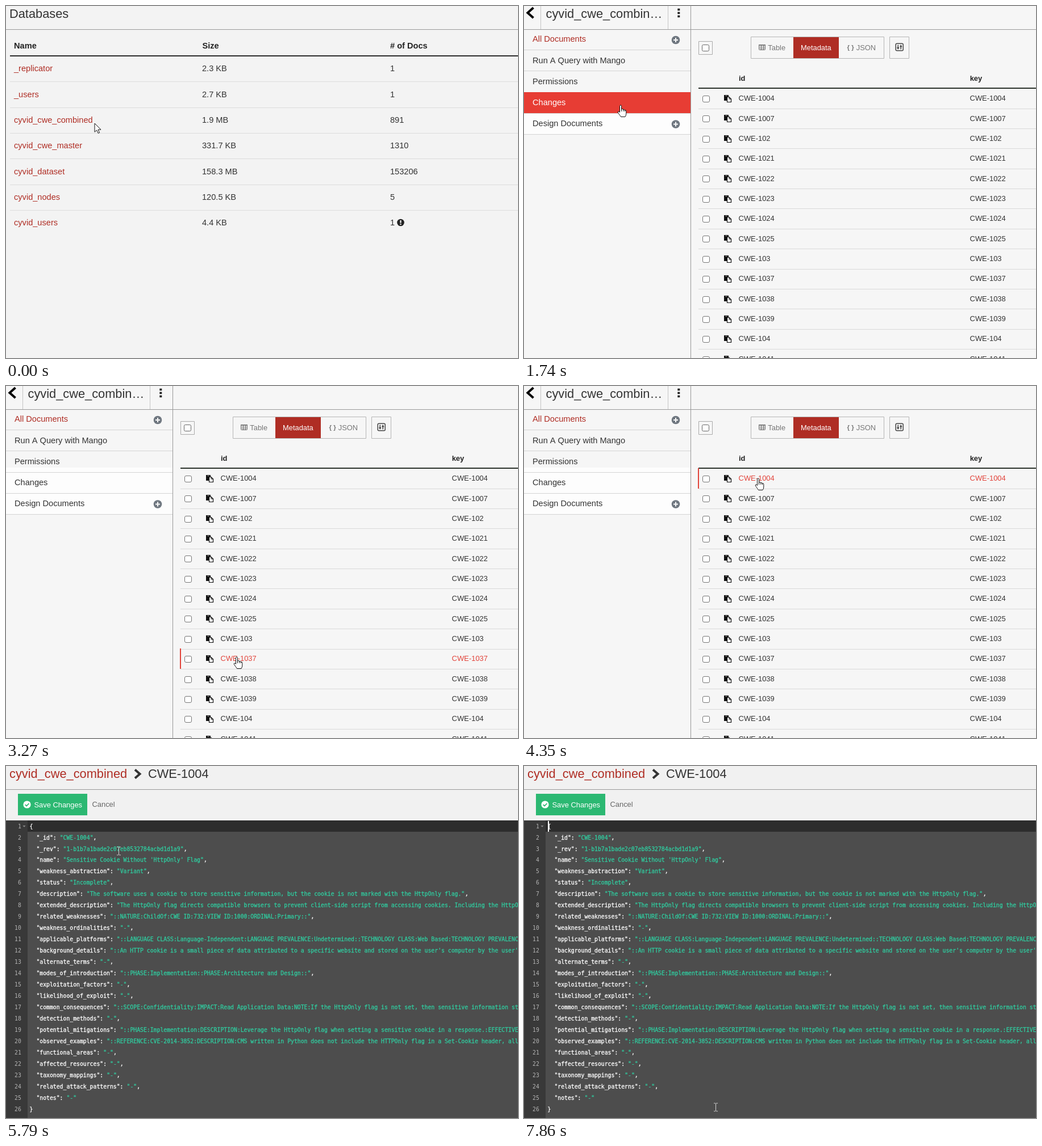
Write an HTML page with a canvas that moves like this. It is 901 px wide and 621 px high and loops after 8000 ms.

```html
<!DOCTYPE html>
<html lang="en">
<head>
<meta charset="utf-8">
<title>Database browser</title>
<style>
html, body { margin: 0; width: 100%; height: 100%; overflow: hidden; background: #f3f3f3; }
canvas { display: block; }
</style>
</head>
<body>
<canvas id="stage" width="901" height="621"></canvas>
<script>
const W = 901, H = 621, LOOP = 8000, STEP = 120;
const ctx = document.getElementById('stage').getContext('2d');
const SANS = '"Liberation Sans", Arial, sans-serif';
const MONO = '"DejaVu Sans Mono", "Noto Sans Mono", monospace';
const BODY = `14.6px ${SANS}`, BOLD = `bold 14.6px ${SANS}`;
const TITLE = `21.8px ${SANS}`, SMALL = `12.9px ${SANS}`, CODE = `9.79px ${MONO}`;
const INK = '#333', LINK = '#af2d24', HOVER = '#e2443b', RULE = '#999';

// Screen changes
const LIST = 1220, ROWS = 1370, EDITOR = 4910, LOADED = 5060;
// Caret toggles, starting visible at LOADED
const BLINKS = [5490, 5910, 6570, 7080, 7470, 7860];

// Pointer moves: start time, number of steps, end x, end y
const START = { x: 156, y: 207 };
const MOVES = [
  [430, 3, 124, 199], [820, 1, 122, 199], [1740, 1, 170, 175],
  [1890, 4, 430, 167], [2400, 4, 416, 300], [2910, 4, 406, 478],
  [3420, 1, 405, 434], [3570, 2, 406, 304], [3840, 4, 408, 167],
  [4350, 1, 412, 163], [4910, 1, 413.5, 164], [5490, 1, 384.5, 159],
  [5640, 1, 286.5, 154], [5790, 1, 198.5, 150], [5910, 1, 188, 151],
  [6060, 4, 95, 318], [6570, 1, 95, 337], [6720, 4, 106, 526],
  [7230, 4, 160, 591], [7740, 2, 337.5, 602]
];

const DATABASES = [
  ['_replicator', '2.3 KB', '1'], ['_users', '2.7 KB', '1'],
  ['cyvid_cwe_combined', '1.9 MB', '891'], ['cyvid_cwe_master', '331.7 KB', '1310'],
  ['cyvid_dataset', '158.3 MB', '153206'], ['cyvid_nodes', '120.5 KB', '5'],
  ['cyvid_users', '4.4 KB', '1']
];
const MENU = ['All Documents', 'Run A Query with Mango', 'Permissions', 'Changes', 'Design Documents'];
const IDS = '1004 1007 102 1021 1022 1023 1024 1025 103 1037 1038 1039 104 1041'.split(' ');

const FIELDS = [
  ['_id', 'CWE-1004'],
  ['_rev', '1-b1b7a1bade2c07eb8532784acbd1d1a9'],
  ['name', "Sensitive Cookie Without 'HttpOnly' Flag"],
  ['weakness_abstraction', 'Variant'],
  ['status', 'Incomplete'],
  ['description', 'The software uses a cookie to store sensitive information, but the cookie is not marked with the HttpOnly flag.'],
  ['extended_description', 'The HttpOnly flag directs compatible browsers to prevent client-side script from accessing cookies. Including the HttpOnly flag'],
  ['related_weaknesses', '::NATURE:ChildOf:CWE ID:732:VIEW ID:1000:ORDINAL:Primary::'],
  ['weakness_ordinalities', '-'],
  ['applicable_platforms', '::LANGUAGE CLASS:Language-Independent:LANGUAGE PREVALENCE:Undetermined::TECHNOLOGY CLASS:Web Based:TECHNOLOGY PREVALENCE'],
  ['background_details', "::An HTTP cookie is a small piece of data attributed to a specific website and stored on the user's computer by the user's web"],
  ['alternate_terms', '-'],
  ['modes_of_introduction', '::PHASE:Implementation::PHASE:Architecture and Design::'],
  ['exploitation_factors', '-'],
  ['likelihood_of_exploit', '-'],
  ['common_consequences', '::SCOPE:Confidentiality:IMPACT:Read Application Data:NOTE:If the HttpOnly flag is not set, then sensitive information stored'],
  ['detection_methods', '-'],
  ['potential_mitigations', '::PHASE:Implementation:DESCRIPTION:Leverage the HttpOnly flag when setting a sensitive cookie in a response.:EFFECTIVENESS'],
  ['observed_examples', '::REFERENCE:CVE-2014-3852:DESCRIPTION:CMS written in Python does not include the HTTPOnly flag in a Set-Cookie header, allowing'],
  ['functional_areas', '-'], ['affected_resources', '-'], ['taxonomy_mappings', '-'],
  ['related_attack_patterns', '-'], ['notes', '-']
];

const HAND = new Path2D('M-1.5 12V1.5Q-1.5 0 0 0T1.5 1.5V7Q4.5 5.5 4.8 8Q7 6.8 7.5 9Q9.8 8 9.8 10.5V15Q9.8 18 8 20.5H.5Q-1 18-4.4 13.5Q-5.5 11.5-4 11Q-2.8 10.6-1.5 12.5Z');
const FINGERS = new Path2D('M1.5 7V11M4.8 8V11M7.5 9V11');
const ARROW = new Path2D('M0 0V15.3L3.6 12 6.2 17.5 8.6 16.5 6 11.1H11Z');
const IBEAM = new Path2D('M-3.5-7H-1L0-6.3 1-7H3.5M0-6.3V6.3M-3.5 7H-1L0 6.3 1 7H3.5');

function rect(x, y, w, h, color) {
  ctx.fillStyle = color;
  ctx.fillRect(x, y, w, h);
}

function frame(x, y, w, h, color, radius = 0, fill) {
  ctx.beginPath();
  ctx.roundRect(x + 0.5, y + 0.5, w - 1, h - 1, radius);
  if (fill) { ctx.fillStyle = fill; ctx.fill(); }
  ctx.strokeStyle = color;
  ctx.lineWidth = 1;
  ctx.stroke();
}

function text(str, x, y, font, color = INK, align = 'left') {
  ctx.font = font;
  ctx.fillStyle = color;
  ctx.textAlign = align;
  ctx.fillText(str, x, y);
}

function disc(x, y, r, color) {
  ctx.fillStyle = color;
  ctx.beginPath();
  ctx.arc(x, y, r, 0, Math.PI * 2);
  ctx.fill();
}

function line(points, color, width) {
  ctx.strokeStyle = color;
  ctx.lineWidth = width;
  ctx.beginPath();
  points.forEach(([x, y]) => ctx.lineTo(x, y));
  ctx.stroke();
}

function plus(x, y, color, mark) {
  disc(x, y, 7.3, color);
  rect(x - 4, y - 1, 8, 2, mark);
  rect(x - 1, y - 4, 2, 8, mark);
}

function pointerAt(t) {
  let { x, y } = START;
  for (const [t0, n, ex, ey] of MOVES) {
    if (t < t0) break;
    const k = Math.min(n, Math.floor((t - t0) / STEP) + 1) / n;
    x += (ex - x) * k;
    y += (ey - y) * k;
  }
  return { x, y };
}

function drawPointer(t) {
  const { x, y } = pointerAt(t);
  ctx.save();
  ctx.translate(x, y);
  ctx.lineJoin = 'round';
  ctx.lineWidth = 1;
  if (t >= EDITOR) {
    ctx.strokeStyle = '#d0d0d0';
    ctx.stroke(IBEAM);
  } else {
    const shape = t < 430 ? ARROW : HAND;
    ctx.fillStyle = '#fff';
    ctx.strokeStyle = '#111';
    ctx.fill(shape);
    ctx.stroke(shape);
    if (shape === HAND) ctx.stroke(FINGERS);
  }
  ctx.restore();
}

function drawDatabases() {
  rect(0, 0, W, H, '#f3f3f3');
  text('Databases', 6, 21, TITLE);
  rect(0, 41, W, 1, RULE);
  ['Name', 'Size', '# of Docs'].forEach((s, i) => text(s, [14, 345.5, 676][i], 75, BOLD, '#222'));
  rect(7, 87, W, 2, '#2b2b2b');
  DATABASES.forEach(([name, size, docs], i) => {
    const y = 115.2 + i * 45.33;
    text(name, 14, y, BODY, LINK);
    text(size, 345, y, BODY);
    text(docs, 676, y, BODY);
    if (i < 6) rect(7, Math.round(133.2 + i * 45.33), W, 1, '#dcdcdc');
  });
  disc(694.5, 382, 6.3, '#222');
  rect(693.4, 378, 2.2, 4.8, '#f3f3f3');
  rect(693.4, 384, 2.2, 2, '#f3f3f3');
}

function drawSidebar(t) {
  if (t >= 1740) {
    const top = t < 1890 ? 152 : 144;
    rect(0, top, 293, 226 - top, '#fdfdfd');
  }
  const active = t < 1740 ? 4 : t < 1890 ? 3 : -1;
  MENU.forEach((label, i) => {
    const y = 77 + Math.round(i * 37.25), on = i === active;
    if (on) rect(0, y - 37, 293, 37, '#e73d34');
    rect(0, y, 293, 1, '#d4d4d4');
    text(label, 15, 63.3 + i * 37.2, BODY, on ? '#fff' : i ? INK : LINK);
    if (i % 4 === 0) {
      plus(267, i ? 208.5 : 60, on ? '#fff' : '#6f7780', on ? '#e73d34' : '#f8f8f8');
    }
  });
}

function drawToolbar(ready) {
  frame(307, 62, 25, 24, '#aaa');
  frame(313, 68, 13, 12, ready ? '#666' : '#c4c4c4', 2, ready ? '#fff' : '#f7f7f7');
  frame(399, 54, 235, 39, '#b5b5b5');
  rect(474, 55, 80, 37, LINK);
  text('Table', 429.3, 78, SMALL, '#777');
  text('Metadata', 487, 78, SMALL, '#fff');
  text('JSON', 584.7, 78, SMALL, '#777');
  text('{ }', 568.5, 77, `bold 11.5px ${SANS}`, '#777');
  frame(413, 68, 12, 10, '#777', 1);
  rect(413, 68, 12, 2, '#777');
  rect(413, 72, 12, 1, '#777');
  rect(413, 75, 12, 1, '#777');
  rect(417, 69, 1, 9, '#777');
  rect(421, 69, 1, 9, '#777');
  frame(643, 54, 35, 39, '#b5b5b5');
  ctx.lineWidth = 1.5;
  ctx.strokeStyle = '#444';
  ctx.beginPath();
  ctx.roundRect(654.2, 66.2, 13, 12.6, 2);
  ctx.stroke();
  rect(657.5, 68.5, 1.5, 8, '#444');
  rect(662.5, 68.5, 1.5, 8, '#444');
  rect(656.4, 72.8, 3.7, 2, '#444');
  rect(661.4, 70.4, 3.7, 2, '#444');
}

function copyIcon(x, y) {
  rect(x, y, 8, 10, '#111');
  rect(x + 2, y + 1, 4, 1, '#888');
  ctx.beginPath();
  ctx.moveTo(x + 5.5, y + 3.5);
  ctx.lineTo(x + 9, y + 3.5);
  ctx.lineTo(x + 12.5, y + 7);
  ctx.lineTo(x + 12.5, y + 12.5);
  ctx.lineTo(x + 5.5, y + 12.5);
  ctx.closePath();
  ctx.fillStyle = '#f8f8f8';
  ctx.fill();
  ctx.strokeStyle = '#111';
  ctx.lineWidth = 1.2;
  ctx.stroke();
  line([[x + 9, y + 3.5], [x + 9, y + 7], [x + 12.5, y + 7]], '#111', 1);
}

function hoveredRow(t) {
  if (t < 1890) return -1;
  // The highlight trails the pointer for one step at the turn
  const p = pointerAt(t >= 3420 && t < 3570 ? 3419 : t);
  return p.x < 306 ? -1 : Math.floor((p.y - 145.5) / 35.35);
}

function drawRows(t) {
  const hover = hoveredRow(t), head = `bold 12.9px ${SANS}`;
  text('id', 378, 132, head, '#222');
  text('key', 784.7, 132, head, '#222');
  IDS.forEach((id, i) => {
    const y = i * 35.35, color = i === hover ? HOVER : INK;
    const top = Math.round(157 + y);
    frame(314, top + 1, 13, 12, '#777', 2.5, '#fff');
    copyIcon(352, top);
    text('CWE-' + id, 377.6, 167.2 + y, SMALL, color);
    text('CWE-' + id, 784.6, 167.2 + y, SMALL, color);
    rect(307, Math.round(180.7 + y), W, 1, '#d9d9d9');
  });
  rect(307, 144, W, 2, '#2c332c');
  if (hover >= 0) rect(306, Math.round(145 + hover * 35.35), 2, 36, HOVER);
}

function drawList(t) {
  const ready = t >= ROWS;
  rect(0, 0, W, H, ready ? '#f6f6f6' : '#f4f4f4');
  drawSidebar(t);
  line([[16.5, 3], [6.5, 12], [16.5, 21]], '#000', 4);
  text('cyvid_cwe_combin…', 38.5, 21, TITLE);
  for (const y of [4.5, 10.5, 16.5]) rect(270.3, y, 4, 3.6, '#222');
  rect(29, 0, 1, 41, '#c4c4c4');
  rect(253, 0, 1, 41, '#c4c4c4');
  drawToolbar(ready);
  if (ready) drawRows(t);
  rect(0, 41, W, 1, RULE);
  rect(293, 0, 1, H, RULE);
}

function drawCode(t) {
  const green = '#30cda0', cell = 5.893;
  rect(38, 96, W, 20, '#2d2d2d');
  // A hairline outline gives the small type its weight
  const put = (s, col, y, color) => {
    const x = 41.6 + col * cell;
    text(s, x, y, CODE, color);
    ctx.strokeStyle = color;
    ctx.lineWidth = 0.3;
    ctx.strokeText(s, x, y);
  };
  const baseline = i => 109.6 + i * 19.96;
  const last = FIELDS.length + 1;
  for (let i = 0; i <= last; i++) text(i + 1, 26.8, baseline(i), CODE, '#b4b4b4', 'right');
  ctx.fillStyle = '#888';
  ctx.beginPath();
  ctx.moveTo(29.5, 105);
  ctx.lineTo(34.5, 105);
  ctx.lineTo(32, 108);
  ctx.fill();
  put('{', 0, baseline(0), '#fff');
  FIELDS.forEach(([key, value], i) => {
    const y = baseline(i + 1), name = `"${key}":`, str = `"${value}"`;
    const col = name.length + 3;
    put(name, 2, y, '#fff');
    put(str, col, y, green);
    if (i < FIELDS.length - 1) put(',', col + str.length, y, '#fff');
  });
  put('}', 0, baseline(last), '#fff');
  const caretOn = BLINKS.filter(b => t >= b).length % 2 === 0;
  if (caretOn) rect(42, 97, 2, 19, '#fff');
}

function drawEditor(t) {
  rect(0, 0, W, 96, '#f1f1f1');
  text('cyvid_cwe_combined', 6, 21, TITLE, LINK);
  line([[227, 6.5], [235.5, 14], [227, 21.5]], INK, 4);
  text('CWE-1004', 250, 21, TITLE);
  rect(0, 41, W, 1, RULE);
  rect(21, 49, 122, 38, '#2cb872');
  disc(37, 68, 6.6, '#fff');
  line([[33.7, 68.2], [36.2, 70.5], [40.4, 66]], '#2cb872', 1.8);
  text('Save Changes', 49.5, 72.7, SMALL, '#fff');
  text('Cancel', 151.5, 72, SMALL, '#666');
  rect(0, 96, W, H - 96, '#4d4d4d');
  rect(0, 96, 38, H - 96, '#393939');
  if (t >= LOADED) drawCode(t);
  else rect(799, 123, 8.5, 3.5, '#fff');
}

function draw(now) {
  const t = now % LOOP;
  if (t < LIST) drawDatabases();
  else if (t < EDITOR) drawList(t);
  else drawEditor(t);
  drawPointer(t);
}

const begin = performance.now();
function tick() {
  draw(performance.now() - begin);
  requestAnimationFrame(tick);
}
tick();
</script>
</body>
</html>
```
